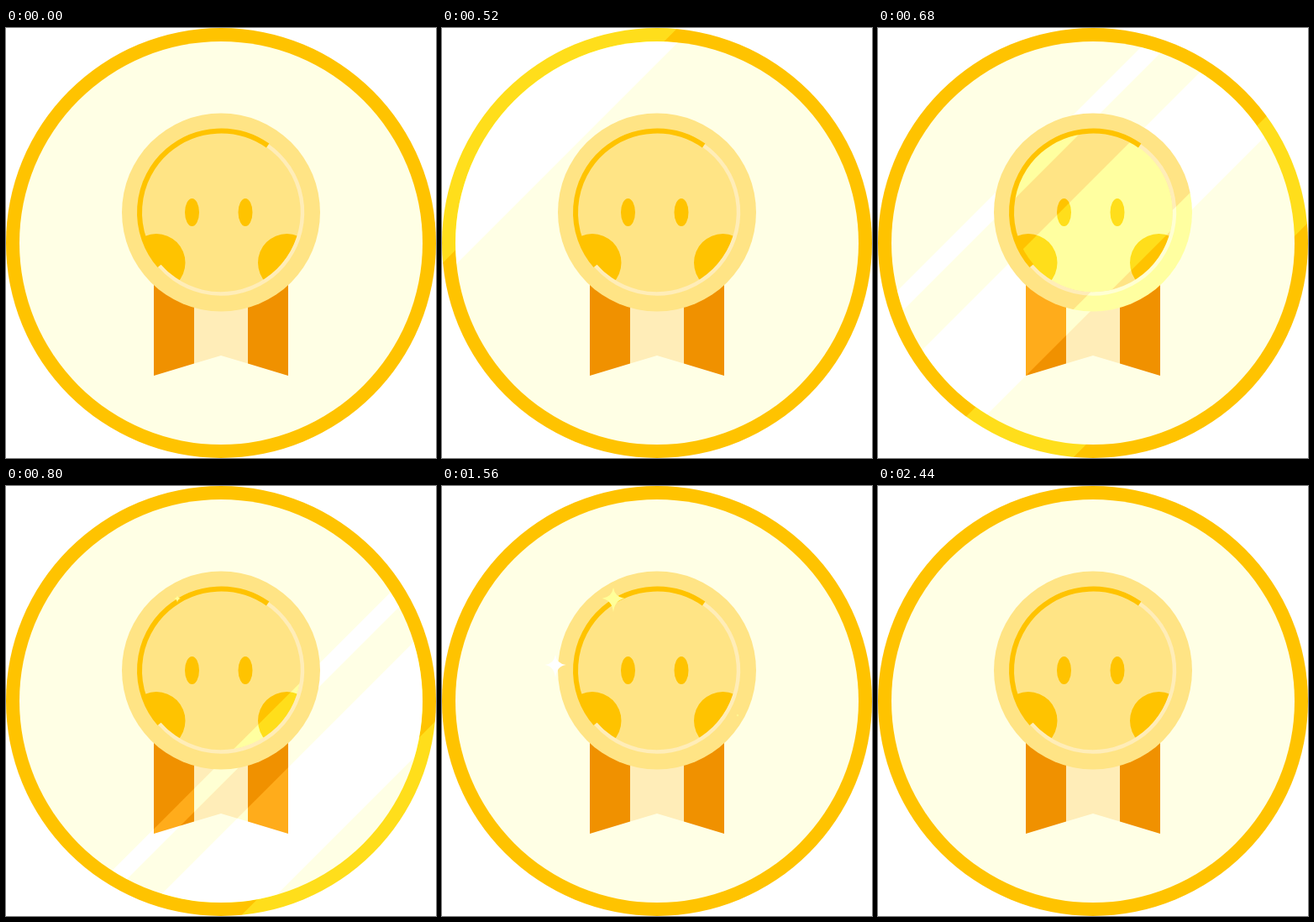
An HTML page with a canvas for the animation above (2480 ms loop, 512 by 512 pixels).

```html
<!DOCTYPE html>
<html lang="en">
<head>
<meta charset="utf-8">
<title>Medal</title>
<style>
  html, body { margin: 0; width: 100%; height: 100%; overflow: hidden; background: #fff; }
  canvas { display: block; width: 512px; height: 512px; }
</style>
</head>
<body>
<canvas id="stage" width="512" height="512"></canvas>
<script>
const ctx = document.getElementById('stage').getContext('2d');
const LOOP = 2480, STEP = 40;
const GOLD = '#ffc300', CREAM = '#ffffe5', BUTTER = '#ffe485',
      PALE = '#ffedb8', ORANGE = '#f09100', LEMON = '#ffff99', GLOW = 'rgb(27,27,27)';
const MX = 256, MY = 219.5;

// Each sparkle swells and fades along half a sine wave
const stars = [
  { x: 204, y: 134, peak: 22, from: 740, to: 1780, colour: LEMON },
  { x: 135, y: 213, peak: 13.5, from: 1000, to: 1920, colour: '#fff' },
  { x: 327, y: 304, peak: 11.5, from: 1560, to: 2440, colour: LEMON },
  { x: 352, y: 273, peak: 5, from: 1480, to: 2320, colour: LEMON }
];

const easeInOut = u => u < 0.5 ? 2 * u * u : 1 - 2 * (1 - u) ** 2;

function disc(x, y, rx, ry = rx) {
  const p = new Path2D();
  p.ellipse(x, y, rx, ry, 0, 0, Math.PI * 2);
  return p;
}

function poly(...pts) {
  const p = new Path2D();
  pts.forEach(([x, y]) => p.lineTo(x, y));
  p.closePath();
  return p;
}

function join(...paths) {
  const p = new Path2D();
  paths.forEach(q => p.addPath(q));
  return p;
}

const rim = disc(256, 256, 256);
const field = disc(256, 256, 240);
const tails = join(
  poly([176, 290], [224, 290], [224, 399.6], [176, 414]),
  poly([288, 290], [336, 290], [336, 414], [288, 399.6])
);
const middle = poly([224, 290], [288, 290], [288, 399.6], [256, 390], [224, 399.6]);
const medal = disc(MX, MY, 118);
const face = disc(MX, MY, 95);
const border = join(medal, face);
const features = join(
  disc(179, 279.5, 34.5), disc(334.5, 279.5, 34.5),
  disc(221.5, 219.5, 8.5, 16.5), disc(285, 219.5, 8.5, 16.5)
);

function fill(path, colour) {
  ctx.fillStyle = colour;
  ctx.fill(path);
}

// Brighten diagonal bands, each bounded by two values of x + y
function shine(path, bands) {
  ctx.save();
  ctx.clip(path, 'evenodd');
  ctx.globalCompositeOperation = 'lighter';
  for (const [from, to] of bands) {
    fill(poly([from, 0], [to, 0], [to - 600, 600], [from - 600, 600]), GLOW);
  }
  ctx.restore();
}

function layer(path, colour, bands) {
  fill(path, colour);
  shine(path, bands);
}

function arc(from, to, colour, width) {
  ctx.beginPath();
  ctx.arc(MX, MY, 97, from * Math.PI / 180, to * Math.PI / 180);
  ctx.strokeStyle = colour;
  ctx.lineWidth = width;
  ctx.stroke();
}

function star({ x, y, peak, from, to, colour }, t) {
  if (t <= from || t >= to) return;
  const r = peak * Math.sin(Math.PI * (t - from) / (to - from));
  const up = r * 0.95, down = r * 1.2, k = r * 0.12;
  const p = new Path2D();
  p.moveTo(x, y - up);
  p.quadraticCurveTo(x + k, y - k, x + r, y);
  p.quadraticCurveTo(x + k, y + k, x, y + down);
  p.quadraticCurveTo(x - k, y + k, x - r, y);
  p.quadraticCurveTo(x - k, y - k, x, y - up);
  fill(p, colour);
}

// The wide and thin bands sweep evenly, their rear edges a little faster
function fieldBands(t) {
  if (t < 360 || t >= 960) return [];
  const edge = (mid, speed) => mid + speed * (t - 680);
  return [
    [edge(436, 1.96), edge(590, 1.825)],
    [edge(336, 2.07), edge(366, 2.05)]
  ];
}

function rimBands(t) {
  if (t < 360 || t >= 880) return [];
  const lead = 110 + 900 * easeInOut((t - 360) / 520);
  return [[lead - 176, lead]];
}

function draw(t) {
  const inner = fieldBands(t), outer = rimBands(t);

  ctx.fillStyle = '#fff';
  ctx.fillRect(0, 0, 512, 512);
  layer(rim, GOLD, outer);
  layer(field, CREAM, inner);
  layer(tails, ORANGE, inner);
  layer(middle, PALE, inner);

  fill(medal, BUTTER);
  ctx.save();
  ctx.clip(face);
  fill(features, GOLD);
  ctx.restore();
  shine(face, inner);
  arc(-55, 139, PALE, 4.5);
  arc(139, 305, GOLD, 6);
  shine(border, outer);

  stars.forEach(s => star(s, t));
}

const start = performance.now();
function tick() {
  const t = (performance.now() - start) % LOOP;
  draw(Math.floor(t / STEP) * STEP);
  requestAnimationFrame(tick);
}
tick();
</script>
</body>
</html>
```
